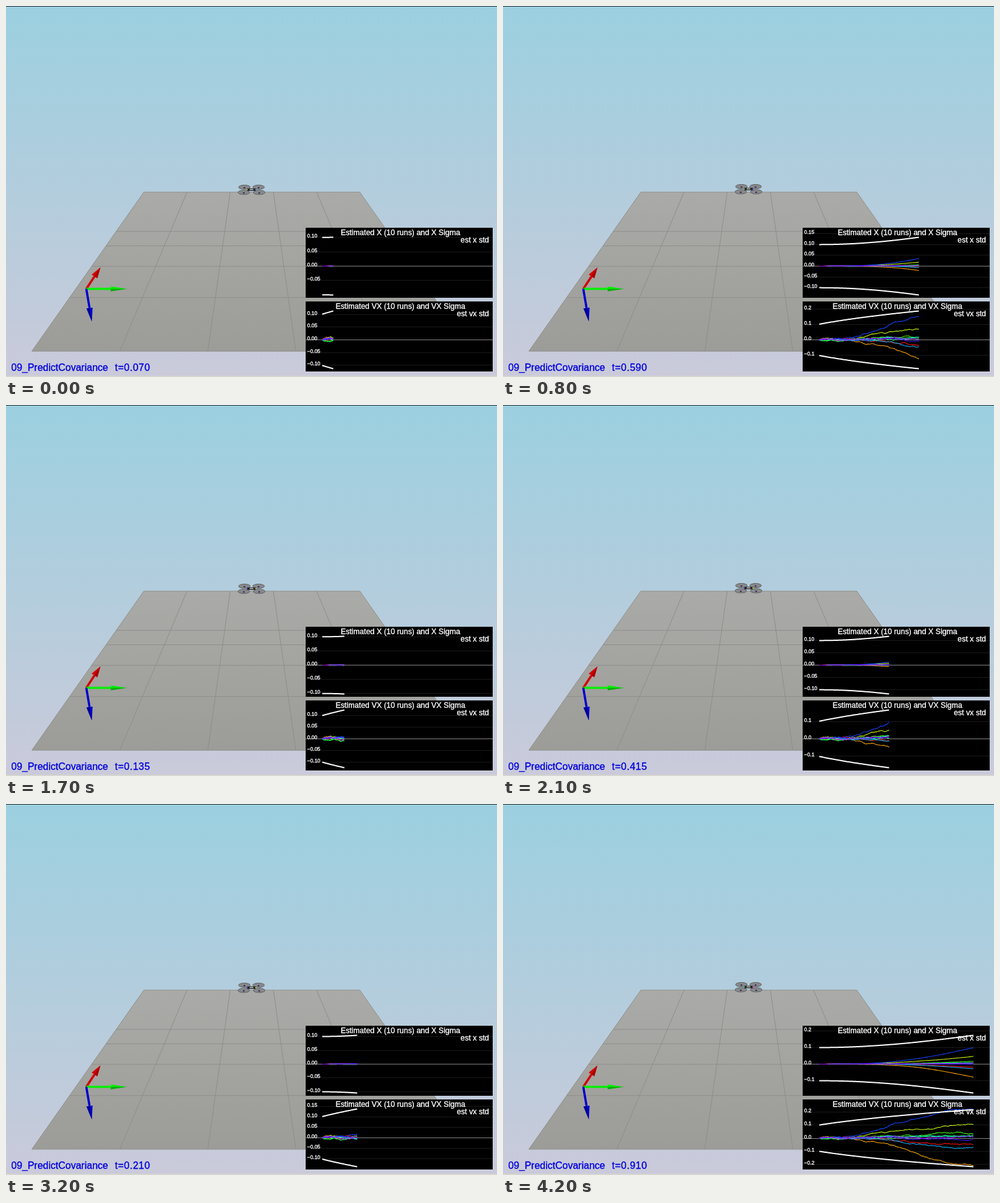
Recreate the animation shown at these times as an HTML page with a canvas. Size 798 by 604 pixels, loop 4300 ms.

```html
<!DOCTYPE html>
<html lang="en">
<head>
<meta charset="utf-8">
<style>
  html, body { margin: 0; width: 100%; height: 100%; overflow: hidden; }
  canvas { display: block; }
</style>
</head>
<body>
<canvas id="stage" width="798" height="604"></canvas>
<script>
const ctx = document.getElementById('stage').getContext('2d');
const DT = 0.005, STEPS = 200;

function poly(points, color, width) {
  ctx.beginPath();
  points.forEach(([x, y]) => ctx.lineTo(x, y));
  if (width) {
    ctx.strokeStyle = color;
    ctx.lineWidth = width;
    ctx.stroke();
  } else {
    ctx.fillStyle = color;
    ctx.fill();
  }
}

// Monoline lettering: a thin outline gives the strokes more weight
function text(str, x, y, size, color = '#fff', align = 'left', spacing = 0) {
  ctx.font = `${size}px "Liberation Sans", Arial, sans-serif`;
  ctx.letterSpacing = spacing + 'px';
  ctx.textAlign = align;
  ctx.fillStyle = ctx.strokeStyle = color;
  ctx.lineWidth = 0.35;
  ctx.fillText(str, x, y);
  ctx.strokeText(str, x, y);
}

function ellipse(x, y, rx, ry, fill, stroke = fill) {
  ctx.beginPath();
  ctx.ellipse(x, y, rx, ry, 0, 0, Math.PI * 2);
  ctx.fillStyle = fill;
  ctx.fill();
  ctx.strokeStyle = stroke;
  ctx.lineWidth = 1;
  ctx.stroke();
}

function gradient(y0, y1, from, to) {
  const g = ctx.createLinearGradient(0, y0, 0, y1);
  g.addColorStop(0, from);
  g.addColorStop(1, to);
  return g;
}

let seed = 7;
function random() {
  seed = (seed * 16807) % 2147483647;
  return seed / 2147483647;
}

function smoothstep(from, to, t) {
  const f = Math.min(1, Math.max(0, (t - from) / (to - from)));
  return f * f * (3 - 2 * f);
}

// Each run eases towards its final velocity with noise; position is the integral
const finalVelocities = [-.055, -.214, .1, .037, .02, .016, -.077, .224, -.016, .006];
const runs = finalVelocities.map((end, index) => {
  const v = [0], x = [0], onset = end < 0 ? 0.15 : 0;
  let noise = 0;
  for (let i = 1; i < STEPS; i++) {
    noise = noise * 0.95 + (random() - 0.5) * 0.006;
    v.push(end * smoothstep(onset, 0.92, i * DT) + noise);
    x.push(x[i - 1] + v[i] * DT);
  }
  return { color: `hsl(${38 * index - 0.8 * index * index},95%,52%)`, x, v };
});

const sigma = {
  x: t => Math.sqrt(0.01 + t * t * (0.0195 + 0.0055 * t)),
  v: t => Math.sqrt(0.01 + 0.042 * t)
};

// Simulated seconds on screen; the simulation restarts twice per loop
function simTime(n) {
  if (n < 15) return 0.07 + 0.065 * n;
  if (n < 18) return 0.005 + 0.065 * (n - 15);
  if (n < 30) return 0.135 + 0.07 * (n - 17);
  return 0.07 * (n - 29);
}

function plot(key, top, title, legend, t) {
  const last = Math.round(t / DT);
  const shown = runs.flatMap(run => run[key].slice(0, last + 1));
  const bound = sigma[key](t);
  const hi = Math.max(bound, ...shown), lo = Math.min(-bound, ...shown);
  const scale = 94 / (hi - lo), zero = top + 15.5 + hi * scale;
  const px = i => 512.6 + 276.8 * i * DT;
  const py = value => zero - value * scale;
  const curve = fn => Array.from({ length: last }, (_, i) => [px(i + 1), py(fn(i + 1))]);

  ctx.save();
  ctx.beginPath();
  ctx.rect(487, top, 304, 114);
  ctx.clip();
  ctx.fillStyle = '#000';
  ctx.fillRect(487, top, 304, 114);

  const step = hi - lo < 0.3 ? 0.05 : 0.1, digits = step < 0.1 ? 2 : 1;
  for (let k = -4; k <= 4; k++) {
    const y = py(k * step);
    if (y < top + 7 || y > top + 109) continue;
    ctx.fillStyle = k ? '#1a1a1a' : '#858585';
    ctx.fillRect(487, Math.floor(y), 304, 1);
    text((k < 0 ? '−' : '') + Math.abs(k * step).toFixed(digits), 489.5, y + 0.5, 8.4);
  }

  text(title, 641, top + 12, 12.4, '#fff', 'center');
  text(legend, 785, top + 23.5, 12.4, '#fff', 'right');

  ctx.lineJoin = 'round';
  for (const run of runs) poly(curve(i => run[key][i]), run.color, 1.1);
  for (const sign of [1, -1]) poly(curve(i => sign * sigma[key](i * DT)), '#fff', 2);
  ctx.restore();
}

function drawGround() {
  const edge = y => 224 - (y - 303) * 182 / 259;
  const line = '#8d8e8a';
  poly([[224, 303], [575, 303], [757, 562.5], [42, 562]], gradient(303, 562, '#aaaba8', '#9c9c98'));
  for (let k = 0; k <= 5; k++) {
    // Perspective: row depth shrinks as 1 / distance
    const y = 230.3 + 331.7 / (1 + 0.713 * k / 2.785 * 1.394);
    const row = k === 5 ? 303 : y;
    poly([[edge(row), row], [799 - edge(row), row]], line, 1);
    poly([[224 + 70.2 * k, 303], [42 + 143 * k, 562]], line, 1);
  }
}

function arrow(dx, dy, neck, halfWidth, shaft, head) {
  const x = 130.5, y = 460.5, len = Math.hypot(dx, dy);
  const nx = -dy / len * halfWidth, ny = dx / len * halfWidth;
  const bx = x + dx * neck, by = y + dy * neck;
  poly([[x, y], [bx, by]], shaft, 3.6);
  poly([[bx + nx, by + ny], [x + dx, y + dy], [bx - nx, by - ny]], shaft);
  poly([[bx, by], [x + dx, y + dy], [bx + nx, by + ny]], head);
}

function drawDrone(n, t) {
  ctx.save();
  ctx.translate(399, t > 0.4 ? 298 : 299);
  for (const [x, y] of [[11.5, -4], [12.5, 4.5]]) {
    poly([[-x, y], [0, 0], [x, y]], '#39393d', 1.4);
    for (const side of [-x, x]) {
      ellipse(side, y, 9.5, 3.5, '#88898c', '#5c5e61');
      ellipse(side, y + 0.8, 1.2, 0.6, '#20204c');
    }
  }
  ctx.fillStyle = '#28282a';
  ctx.fillRect(-7, -2, 14, 4);
  ctx.fillStyle = '#c8c8c4';
  ctx.fillRect(-3, -1, 6, 1.5);
  for (const side of [-1, 1]) {
    ctx.fillStyle = `hsl(${(n * 97 + side * 80 + 120) % 360},55%,50%)`;
    ctx.fillRect(side * 7 - 1, -1, 2, 2);
  }
  ctx.restore();
}

function draw(now) {
  const n = Math.floor(now / 100) % 43, t = simTime(n);
  ctx.fillStyle = gradient(0, 604, '#9bd0e0', '#cacada');
  ctx.fillRect(0, 0, 798, 604);
  ctx.fillStyle = '#222a2d';
  ctx.fillRect(0, 0, 798, 1);
  ctx.fillStyle = '#d6d5d0';
  ctx.fillRect(0, 602, 798, 2);

  drawGround();
  drawDrone(n, t);
  arrow(23, -35, 0.58, 5.5, '#d00404', '#a80000');
  arrow(66, 0, 0.6, 4, '#00f000', '#10a810');
  arrow(9, 53, 0.59, 5, '#0000cc', '#000096');

  plot('x', 361, 'Estimated X (10 runs) and X Sigma', 'est x std', t);
  plot('v', 481, 'Estimated VX (10 runs) and VX Sigma', 'est vx std', t);
  text('09_PredictCovariance', 8.5, 594, 16, '#0000e0');
  text('t=' + t.toFixed(3), 177, 594, 16, '#0000e0', 'left', 0.5);
}

const start = performance.now();
function tick() {
  draw(performance.now() - start);
  requestAnimationFrame(tick);
}
tick();
</script>
</body>
</html>
```
